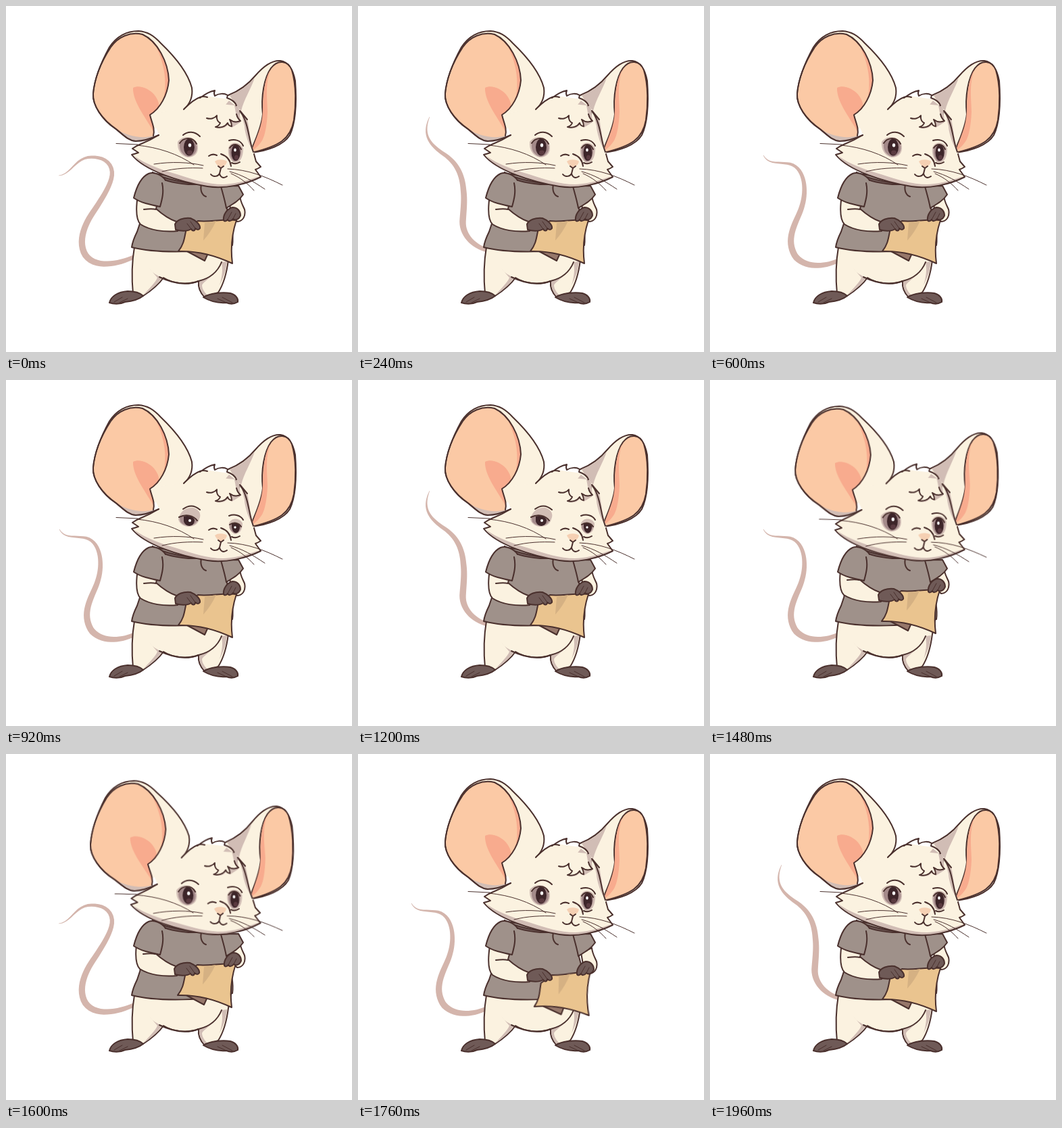
An HTML page that plays this animation: 512x512 px, repeating every 2000 ms.

```html
<!DOCTYPE html>
<html lang="en">
<head>
<meta charset="utf-8">
<title>Little mouse</title>
<style>
html, body { margin: 0; width: 100%; height: 100%; overflow: hidden; background: #fff; }
svg { display: block; width: 100%; height: 100%; }
path, ellipse { stroke-linecap: round; stroke-linejoin: round; }

.line { fill: none; stroke: #4a302d; stroke-width: 2; }
.thin { fill: none; stroke: #4a302d; stroke-width: 1; }
.ink { stroke: #4a302d; stroke-width: 2; }
.fur { fill: #fbf2e0; }
.shade { fill: #d1bdb5; }
.ear { fill: #fbc9a5; }
.deep { fill: #f8ab8e; }
.shirt { fill: #9f918a; }
.paw { fill: #6f5a57; }
.tail { fill: #d4b5ac; }
.sclera { fill: #a48a8a; }
.iris { fill: #3d2529; }

/* Every 2% is one 40 ms tick; steps() keeps motion on those ticks. */
.anim { animation: 2s -1ms infinite; }
.flip { animation: 2s -1ms step-end infinite; }

#tailA { animation-name: tailA; }
#tailB { animation-name: tailB; }
#tailC { animation-name: tailC; }
@keyframes tailA { 0%, 40%, 80% { opacity: 1 } 6%, 46%, 86%, 100% { opacity: 0 } }
@keyframes tailB {
  0%, 12%, 40%, 52%, 80%, 92%, 100% { opacity: 0 }
  6%, 30%, 46%, 70%, 86% { opacity: 1 }
}
@keyframes tailC { 0%, 30%, 70% { opacity: 0 } 12%, 52%, 92%, 100% { opacity: 1 } }

#open { animation-name: open; }
#half { animation-name: half; }
#shut { animation-name: shut; }
@keyframes open { 0%, 68%, 100% { opacity: 1 } 44% { opacity: 0 } }
@keyframes half { 0%, 52%, 68%, 100% { opacity: 0 } 44%, 60% { opacity: 1 } }
@keyframes shut { 0%, 60%, 100% { opacity: 0 } 52% { opacity: 1 } }

#head { transform-origin: 280px 265px; animation-name: head; }
@keyframes head {
  0%, 66% { transform: rotate(0deg); animation-timing-function: steps(4); }
  74% { transform: rotate(-1.2deg); animation-timing-function: steps(3); }
  80% { transform: rotate(-1.7deg); animation-timing-function: steps(4); }
  88%, 100% { transform: rotate(0deg); }
}
#paper { --up: translate(-1px, -6px) rotate(0deg); --down: translate(3px, 9px) rotate(-3.5deg); transform-origin: 286px 318px; }
.left { --up: translate(-1px, -5px); --down: translate(0, 4px); }
.right { --up: translate(1px, -4px); --down: translate(2px, 9px); }
.rightArm { --up: translate(0, -3px); --down: translate(0, 6px); }
.lift { animation-name: lift; }
@keyframes lift {
  0%, 66% { transform: translate(0, 0) rotate(0deg); animation-timing-function: steps(3); }
  72%, 80% { transform: var(--up); animation-timing-function: steps(4); }
  88% { transform: var(--down); animation-timing-function: steps(5); }
  98%, 100% { transform: translate(0, 0) rotate(0deg); }
}
</style>
</head>
<body>
<svg viewBox="0 0 512 512">
  <g id="tails">
    <path id="tailA" class="tail flip" d="M190 371C162 384 128 388 116 366C106 345 118 320 131 302C144 282 157 262 157 247C156 228 139 222 121 224C101 228 95 250 78 251"/>
    <path id="tailB" class="tail flip" d="M189 377C165 388 138 386 126 370C114 350 121 332 130 312C139 293 141 277 139 262C136 244 127 234 114 233C99 231 86 234 79 221"/>
    <path id="tailC" class="tail flip" d="M190 361C168 354 154 337 155 318C156 302 158 288 156 272C154 248 146 234 131 222C112 209 92 195 106 164"/>
  </g>

  <g id="legs">
    <path class="fur ink" d="M190 357C186 380 186 405 188 426L203 429C215 421 227 411 233 402C247 411 269 413 285 407C284 416 288 425 294 431L314 424C323 410 327 392 329 376L334 350Z"/>
    <path class="shade" d="M212 388C218 396 224 399 231 402C224 412 214 421 203 428C212 418 222 408 224 402ZM286 407L304 400C298 405 292 409 290 413C290 420 296 426 299 429L294 430C288 422 285 415 286 407ZM319 379L327 378C326 390 322 402 316 413C320 400 321 390 319 379Z"/>
    <path class="line" d="M227 401C250 412 270 413 285 407C302 403 313 394 319 379"/>
    <path class="paw ink" d="M153 439C155 430 165 423 180 422C190 422 199 425 203 429C197 434 186 437 176 438C168 442 158 441 153 439Z"/>
    <path class="paw ink" d="M292 431C301 425 320 423 332 425C340 427 344 433 343 438C338 441 331 441 326 439C314 440 302 437 292 431Z"/>
    <path class="thin" d="M160 438L172 431M168 439L180 433M320 431L335 439M313 433L326 439"/>
  </g>

  <path class="shirt ink" d="M216 247L325 266L327 300C334 325 337 340 335 354C300 365 225 367 186 357C187 350 190 342 194 334L198 322Z"/>
  <path class="line" d="M289 264C287 273 290 280 296 282"/>
  <path class="paw ink" d="M217 246C231 255 255 260 284 264L270 264C248 262 230 259 217 246Z"/>

  <g class="anim lift left">
    <path class="fur ink" d="M195 280C192 300 192 316 199 323C213 332 234 335 254 333L252 319C240 315 231 308 222 300L226 285Z"/>
    <path class="line" d="M204 301C212 300 218 300 222 301"/>
  </g>
  <path class="fur ink anim lift rightArm" d="M330 288L346 281C347 290 350 294 353 301C355 310 351 319 342 319L334 311Z"/>
  <path class="shirt ink" d="M231 262C234 275 231 286 228 297C213 294 199 291 189 284C193 268 200 253 211 248C219 245 231 250 236 258"/>
  <path class="shirt ink" d="M318 267C332 266 340 266 344 266L351 279C345 288 336 293 326 299C324 288 321 278 318 267Z"/>

  <g id="paper" class="anim lift">
    <path class="ink" fill="#96776a" d="M266 362L294 377L299 366Z"/>
    <path class="ink" fill="#eac48f" d="M284 318C302 320 320 315 341 317C334 338 332 358 335 381C312 370 285 362 255 363C264 352 264 342 267 329Z"/>
    <path fill="#d5b183" d="M294 321L311 318C306 329 299 339 292 347Z"/>
  </g>

  <g class="anim lift left">
    <path class="paw ink" d="M250 323C253 316 263 313 273 314C281 317 288 324 287 329C285 332 282 331 280 329C280 333 276 334 274 330C268 334 257 333 251 331Z"/>
    <path class="thin" d="M273 319L280 329M268 322L274 330"/>
  </g>
  <g class="anim lift right">
    <path class="paw ink" d="M322 317C321 309 327 300 335 298C343 298 347 304 347 310C345 316 339 318 336 315C333 319 329 319 328 316C326 319 323 319 322 317Z"/>
    <path class="thin" d="M334 305L328 316M340 307L336 315"/>
  </g>

  <g id="head" class="anim">
    <path class="fur ink" d="M192 200C180 199 172 189 161 181C142 168 128 147 129 130C131 106 142 81 153 61C163 46 178 37 196 37C209 38 218 43 229 55C251 76 269 98 275 121C277 136 271 146 263 153"/>
    <path class="fur ink" d="M329 132C347 125 360 114 369 103C381 89 393 80 406 81C419 83 425 94 428 111C430 139 430 170 420 191C411 206 387 214 364 217"/>
    <path class="shade" d="M331 132Q353 124 368 106C363 122 352 138 348 155L339 146Z"/>
    <path class="ear ink" d="M362 216C368 199 378 181 380 160C377 134 382 106 392 92C402 79 417 80 423 95C430 118 429 148 426 169C421 197 405 207 364 217Z"/>
    <path class="deep" d="M380 156C381 135 381 111 391 95C383 117 387 139 387 157C386 178 383 192 379 199C374 207 369 211 364 214C370 194 379 180 380 156Z"/>

    <path class="fur" d="M214 160L263 152C272 145 283 135 295 133L330 138L345 158L356 168C361 183 361 201 367 216L370 229L377 237L371 243L377 253C356 263 326 271 298 267C257 260 209 244 187 220L195 217L187 211L200 204L226 190Z"/>
    <path class="shade" d="M190 222C205 233 228 242 253 249C278 257 298 264 321 264C346 263 360 256 376 252C355 264 323 271 298 267C257 260 207 244 190 222ZM347 153L357 168C361 184 361 201 367 216C359 207 353 186 353 178Z"/>

    <path class="shade" d="M161 181C184 193 204 195 218 191L216 197C203 202 187 202 180 196Z"/>
    <path class="ear" d="M218 192C202 197 180 193 163 182C143 168 130 149 130 130C132 106 143 82 155 62C166 45 184 38 202 42C224 52 240 83 241 110C239 132 228 152 213 161C215 172 221 180 218 192Z"/>
    <path class="deep" d="M188 121C197 116 212 122 220 132C226 140 227 146 226 151C222 156 217 158 213 161C215 170 220 180 219 187C209 168 187 142 188 121ZM217 51C231 66 240 86 241 110C240 123 237 131 233 138C240 109 232 75 217 51Z"/>
    <path class="line" d="M163 182C142 168 128 147 129 130C131 106 142 81 155 61C166 45 184 38 202 42C224 52 240 83 241 110C239 132 228 152 213 161C215 171 221 181 218 192M163 182C172 189 180 199 192 200C204 200 213 197 226 191"/>

    <path class="line" d="M263 153C268 148 276 139 287 135C291 133 295 134 298 135M287 136C296 130 300 127 309 125C307 129 308 131 309 133C315 129 323 129 328 132L327 136C333 138 339 142 341 147L339 149C345 152 346 158 344 163"/>
    <path class="shade" d="M311 163L316 174L311 180C319 183 325 180 329 175L334 180L347 172L345 152L330 140Z"/>
    <path class="fur" d="M297 164C303 168 309 166 312 162C311 168 314 172 317 173C316 176 313 178 310 179C318 181 325 178 328 173C329 176 331 178 334 178C334 172 332 170 331 168C336 172 342 172 346 170L340 158L338 147L318 145Z"/>
    <path class="line" d="M297 166C303 168 309 166 312 162C311 168 314 172 317 173C316 176 313 178 310 179C318 181 325 178 328 173C329 176 331 178 334 178C334 172 332 170 331 168C336 172 342 172 347 170C343 167 342 164 341 160"/>

    <path class="line" d="M347 157C359 172 359 199 366 216M367 219L370 230L377 238C374 240 372 241 369 242L377 253C355 264 325 271 298 267C257 260 205 244 186 220C190 219 193 218 196 217L187 211C191 208 195 206 200 204C210 200 218 196 226 191M346 155L357 168"/>

    <g id="open" class="flip">
      <path class="shade" d="M254 201C262 190 281 192 284 207C285 219 278 224 269 224C259 222 253 213 254 201ZM329 210C333 200 346 200 351 211C351 227 344 234 336 231C330 226 328 218 329 210Z"/>
      <path class="sclera" d="M257 204C264 194 279 195 282 207C284 217 276 223 269 223C261 220 256 214 257 204ZM331 211C336 203 344 203 348 213C348 225 343 231 337 230C332 226 330 219 331 211Z"/>
      <ellipse class="iris" cx="271" cy="209" rx="8" ry="12.500"/>
      <ellipse class="iris" cx="340" cy="217" rx="6.500" ry="12"/>
      <ellipse cx="272" cy="217" rx="4" ry="3.500" fill="#5a3a40"/>
      <ellipse cx="341" cy="224" rx="3" ry="3.500" fill="#5a3a40"/>
      <ellipse cx="272" cy="206" rx="2.200" ry="2.800" fill="#fff"/>
      <ellipse cx="339" cy="213" rx="1.800" ry="2.500" fill="#fff"/>
      <path class="line" d="M257 203C262 195 276 192 282 204M331 210C336 203 344 203 348 212M262 191C269 185 279 185 287 193M330 199C338 197 347 198 351 207"/>
    </g>

    <g id="half" class="flip">
      <path class="shade" d="M255 206C258 193 267 188 277 189C285 191 290 198 286 206C284 214 277 217 269 217C261 216 256 211 255 206ZM330 212C334 203 346 204 350 212C350 221 346 228 338 228C331 224 329 217 330 212Z"/>
      <path class="sclera" d="M257 204C267 198 277 200 283 208C280 216 266 219 258 210ZM331 214C337 210 344 211 348 216C347 227 336 231 331 219Z"/>
      <path class="iris" d="M263 202C271 199 278 203 279 207C279 218 266 219 263 209ZM334 213C339 211 344 212 346 216C346 229 336 230 334 218Z"/>
      <ellipse cx="272" cy="208" rx="2" ry="2" fill="#fff"/>
      <ellipse cx="339" cy="218" rx="1.700" ry="1.800" fill="#fff"/>
      <path class="line" d="M256 203C266 198 277 200 283 208M331 214C337 210 344 211 348 217M262 191C270 185 279 185 287 192M330 201C338 198 347 200 351 207"/>
    </g>

    <g id="shut" class="flip">
      <path class="shade" d="M255 208C258 193 267 188 277 190C285 192 290 200 284 212Q269 218 255 208ZM330 217C334 205 346 206 350 219Q340 226 330 217Z"/>
      <path class="line" d="M255 208C262 216 276 217 284 212M330 218C335 225 345 226 350 220M262 192C270 186 279 186 287 193M330 202C338 199 347 201 351 208"/>
    </g>

    <path fill="#f5d0b3" d="M309 230C314 226 323 227 327 230C326 235 322 238 318 239C314 238 311 234 309 230Z"/>
    <path class="line" d="M300 222C304 219 308 219 312 221M318 219C327 222 332 228 333 237M314 237L318 240L322 237M318 240L316 248M303 249C307 254 314 252 316 248C318 255 323 255 327 252"/>
    <path class="line" d="M334 232C338 234 343 233 346 231"/>
    <path class="thin" d="M163 203.500L195 205M194 206C225 209 255 219 278 235M219 234C245 230 270 231 292 236M231 245C250 240 272 239 291 240M328 241C358 242 383 252 409 265M331 245C350 250 365 259 383 271M333 248C347 254 358 263 367 273"/>
  </g>
</svg>
<script>
// Turn each tail's centre line into a tapered outline.
const STEPS = 60;
for (const tail of document.querySelectorAll('.tail')) {
  const length = tail.getTotalLength();
  const sideA = [], sideB = [];
  for (let i = 0; i <= STEPS; i++) {
    const u = i / STEPS, at = u * length;
    const p = tail.getPointAtLength(at);
    const a = tail.getPointAtLength(Math.max(0, at - 1));
    const b = tail.getPointAtLength(Math.min(length, at + 1));
    const dir = Math.atan2(b.y - a.y, b.x - a.x);
    const half = 0.3 + 4.6 * (1 - u ** 2.5) * (0.6 + 0.4 * Math.min(1, 4 * u));
    const nx = -Math.sin(dir) * half, ny = Math.cos(dir) * half;
    sideA.push([p.x + nx, p.y + ny]);
    sideB.unshift([p.x - nx, p.y - ny]);
  }
  tail.setAttribute('d', 'M' + [...sideA, ...sideB].join('L') + 'Z');
}
</script>
</body>
</html>
```
